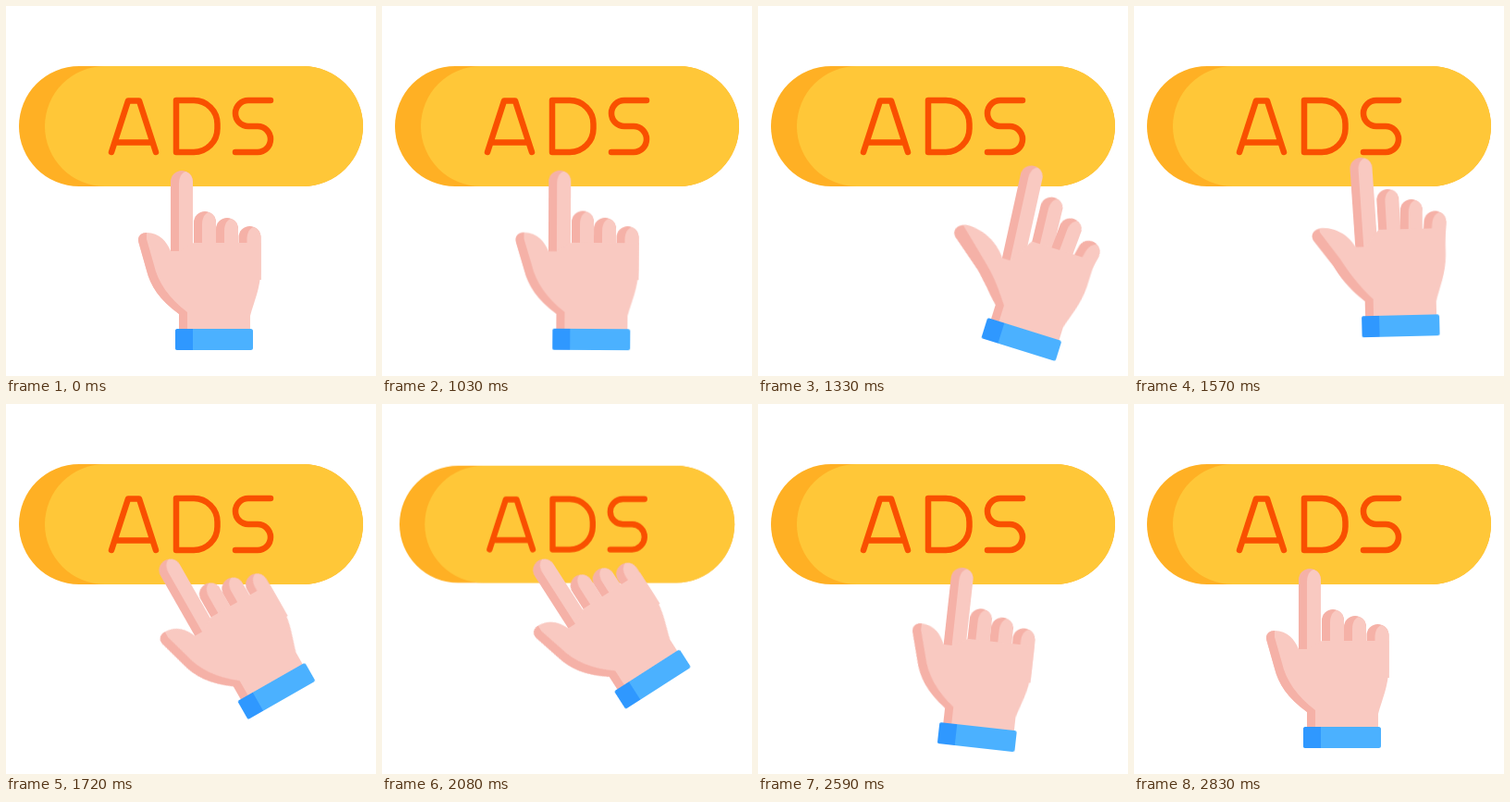
These frames come from a looping animation (400x400 px, 2860 ms). An HTML page:

```html
<!DOCTYPE html>
<html lang="en">
<head>
<meta charset="utf-8">
<title>Ads button</title>
<style>
  html, body { margin: 0; width: 100%; height: 100%; overflow: hidden; background: #fff; }
  svg { display: block; width: 100vw; height: 100vh; }

  .skin { fill: #f9c9c1; }
  .shade { fill: #f5b1a7; }
  .letters { fill: none; stroke: #f95000; stroke-width: 6.5; stroke-linecap: round; stroke-linejoin: round; }

  .button, .hand, .finger, #palm, #edge {
    animation: 2860ms cubic-bezier(.33, 0, .67, 1) infinite;
  }
  .button { transform-origin: 200px 130px; animation-name: press; }
  .hand { transform-origin: 0 0; animation-name: swing; }
  .index { transform-origin: 190px 275px; animation-name: index; }
  .middle { transform-origin: 215px 256px; animation-name: middle; }
  .ring { transform-origin: 239px 256px; animation-name: ring; }
  .little { transform-origin: 263px 262px; animation-name: little; }
  #palm { animation-name: palm; }
  #edge { animation-name: edge; }

  @keyframes press {
    0%, 61.19% { transform: scale(1); }
    64.34%, 69.93% { transform: scale(.956); animation-timing-function: ease-in; }
    72.73% { transform: scale(.973); animation-timing-function: ease-out; }
    76.92% { transform: scale(1.0215); }
    82.5%, 100% { transform: scale(1); }
  }

  /* Position of the cuff centre, then the tilt of the hand */
  @keyframes swing {
    0%, 34.97% { transform: translate(225px, 360.5px) rotate(0deg); }
    47.55% { transform: translate(286px, 360.5px) rotate(17.7deg); animation-timing-function: cubic-bezier(.5, 0, .8, .7); }
    53.85% { transform: translate(287px, 357.5px) rotate(8deg); animation-timing-function: cubic-bezier(.2, .3, .5, 1); }
    61.19% { transform: translate(292.5px, 309.5px) rotate(-30.4deg); }
    64.34%, 69.93% { transform: translate(292.5px, 295.5px) rotate(-33.5deg); animation-timing-function: ease-in; }
    72.73% { transform: translate(292.5px, 297.5px) rotate(-32.7deg); animation-timing-function: cubic-bezier(.33, .05, .7, .85); }
    83.22% { transform: translate(255px, 346px) rotate(10.5deg); animation-timing-function: cubic-bezier(.3, .3, .7, .8); }
    88.46% { transform: translate(240px, 360px) rotate(8deg); animation-timing-function: cubic-bezier(.3, .2, .6, 1); }
    98.95%, 100% { transform: translate(225px, 360.5px) rotate(0deg); }
  }

  @keyframes index {
    0%, 34.97% { transform: translateY(0) rotate(0deg); }
    47.55%, 50% { transform: translateY(-1px) rotate(-5deg); }
    60%, 61.19% { transform: translateY(0) rotate(0deg); }
    64.34%, 69.93% { transform: translateY(9px) rotate(0deg); }
    72.73% { transform: translateY(8px) rotate(0deg); }
    83.22% { transform: translateY(4px) rotate(0deg); }
    98.95%, 100% { transform: translateY(0) rotate(0deg); }
  }
  @keyframes middle {
    0%, 34.97%, 60%, 100% { transform: translateY(0) rotate(0deg); }
    47.55%, 50% { transform: translateY(-19px) rotate(-4deg); }
  }
  @keyframes ring {
    0%, 34.97%, 60%, 100% { transform: translateY(0) rotate(0deg); }
    47.55%, 50% { transform: translateY(-10px) rotate(3deg); }
  }
  @keyframes little {
    0%, 34.97%, 60%, 100% { transform: translateY(0) rotate(0deg); }
    47.55%, 50% { transform: translateY(-2px) rotate(12deg); }
  }

  /* The thumb opens while the hand swings right */
  @keyframes palm {
    0%, 34.97%, 60%, 100% {
      d: path("M178 265H188L203 256H275.5V285C275 305 268 320 264 335V352H187V333C166 318 156 302 152 286L143.5 256C141.5 249 146 245 152 245C166 245 174 255 178 265Z");
    }
    47.55%, 50% {
      d: path("M179 283H188L204 256H275.5V285C275 305 268 320 264 335V352H187V333C172 318 164 308 155 301L123 276C116 269 124 260 134 260C156 261 170 271 179 283Z");
    }
  }
  @keyframes edge {
    0%, 34.97%, 60%, 100% {
      d: path("M152 245C146 245 141.5 249 143.5 256L152 286C156 302 166 318 187 333V352H196V331C176 316 164 298 160 280L152 252Z");
    }
    47.55%, 50% {
      d: path("M128 262C122 264 118 270 123 276L155 301C164 308 172 318 187 333V352H196V331C184 314 176 304 162 292L128 262Z");
    }
  }
</style>
</head>
<body>
<svg viewBox="0 0 400 400" role="img" aria-label="ADS">
  <defs>
    <g id="short">
      <path class="shade" d="M0 58V12a12 12 0 0 1 24 0V58z"/>
      <path class="skin" d="M9 58V14C9 7 12 2 16.500.9A12 12 0 0 1 24 12V58z"/>
    </g>
  </defs>

  <g class="button">
    <rect x="14" y="65" width="372" height="130" rx="65" fill="#ffb024"/>
    <rect x="42" y="65" width="344" height="130" rx="65" fill="#ffc738"/>
    <g class="letters">
      <path d="M114 158L132 102.500H144L162 158M119 147.500H157"/>
      <path d="M184 102H203A25.500 25.500 0 0 1 228.500 127.500V132.500A25.500 25.500 0 0 1 203 158H184Z"/>
      <path d="M286 102H262a14 14 0 0 0 0 28H272a14 14 0 0 1 0 28H248"/>
    </g>
  </g>

  <g class="hand">
    <g transform="translate(-225 -360.5)">
      <g class="finger index">
        <path class="shade" d="M178 290V190a12 12 0 0 1 24 0V290z"/>
        <path class="skin" d="M187 290V192C187 185 190 180 194.500 178.900A12 12 0 0 1 202 190V290z"/>
      </g>
      <g class="finger middle"><use href="#short" x="203" y="222"/></g>
      <g class="finger ring"><use href="#short" x="227" y="229"/></g>
      <g class="finger little"><use href="#short" x="251.500" y="238"/></g>
      <path id="palm" class="skin" d="M178 265H188L203 256H275.500V285C275 305 268 320 264 335V352H187V333C166 318 156 302 152 286L143.500 256C141.500 249 146 245 152 245C166 245 174 255 178 265Z"/>
      <path id="edge" class="shade" d="M152 245C146 245 141.500 249 143.500 256L152 286C156 302 166 318 187 333V352H196V331C176 316 164 298 160 280L152 252Z"/>
      <rect x="183" y="349" width="84" height="23" rx="2.500" fill="#4bb1ff"/>
      <path d="M202 349H185.500a2.500 2.500 0 0 0-2.500 2.500v18a2.500 2.500 0 0 0 2.500 2.500H202z" fill="#2f98ff"/>
    </g>
  </g>
</svg>
</body>
</html>
```
